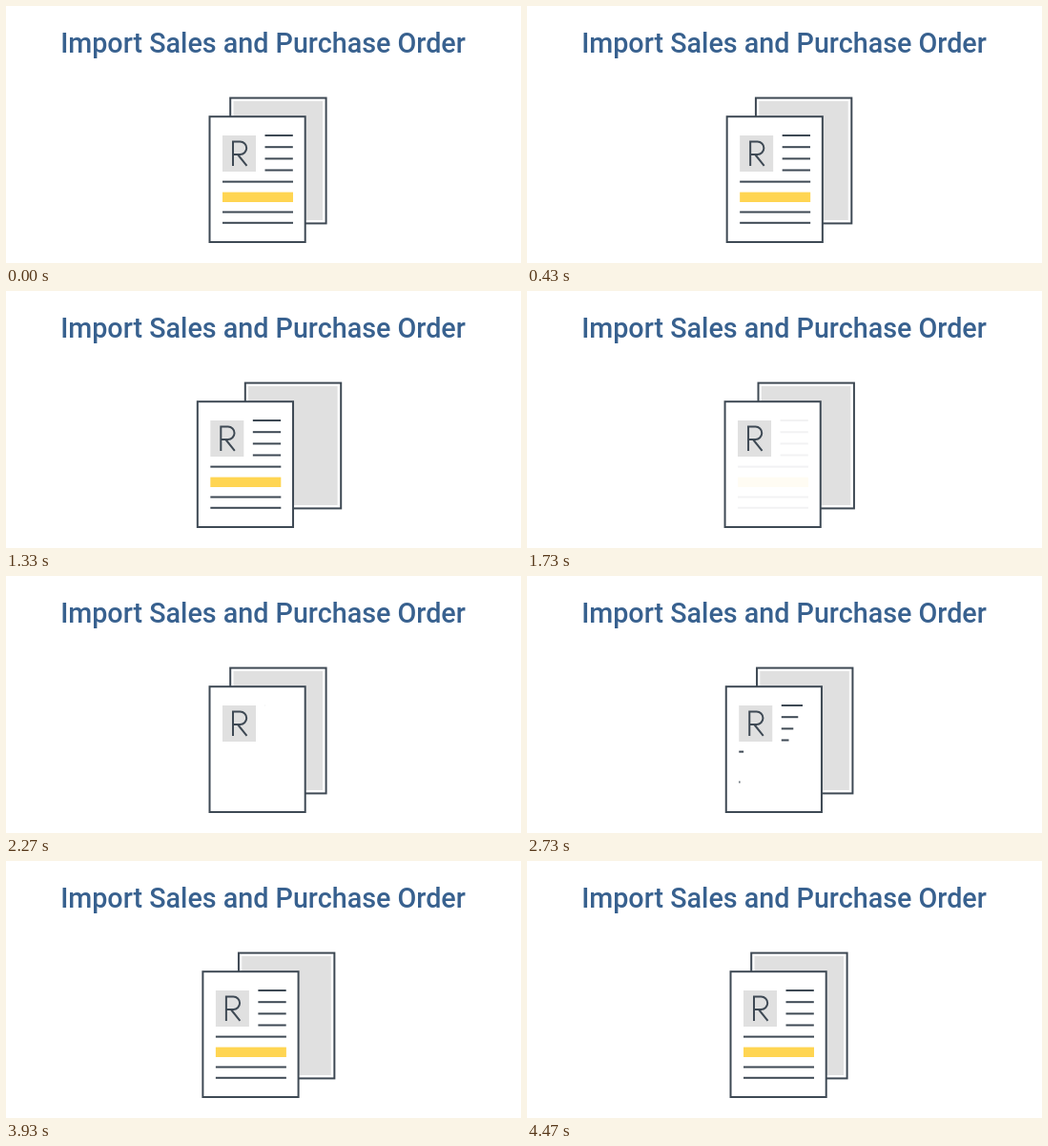
Animation of 540 by 270 pixels, one loop 4.51 s. Source, as an HTML page:

```html
<!DOCTYPE html>
<html lang="en">
<head>
<meta charset="utf-8">
<title>Import Sales and Purchase Order</title>
<style>
  html, body { margin: 0; width: 100%; height: 100%; overflow: hidden; background: #fff; }
  svg { display: block; width: 540px; height: 270px; }
  text { font: 500 28.7px Roboto, sans-serif; fill: #38618f; text-anchor: middle; }
  .page { fill: #fff; stroke: #3e4954; stroke-width: 2; }
  .ink { fill: none; stroke: #3e4954; stroke-width: 2; }
  .shade { fill: #e0e0e0; }
</style>
</head>
<body>
<svg viewBox="0 0 540 270">
  <text x="269.5" y="49">Import Sales and Purchase Order</text>
  <g id="back">
    <rect class="page" x="235.2" y="96.6" width="100.4" height="131.8"/>
    <rect class="shade" x="238.5" y="100" width="93.5" height="125"/>
  </g>
  <g id="front">
    <rect class="page" x="213.5" y="116.2" width="100.2" height="131.8"/>
    <rect class="shade" x="227" y="136" width="35" height="38"/>
    <path class="ink" d="M238 168V142.5h7.5a6.7 6.7 0 0 1 0 13.4H238M243 156l9.5 11.8"/>
    <g id="lines"></g>
  </g>
</svg>
<script>
const LOOP = 4510, HALF = LOOP / 2;
const REVEAL = HALF, STAGGER = 80;
const $ = id => document.getElementById(id);

// Smooth 0..1 progress from a start time over a duration
const ease = (t, start, duration) => {
  const p = Math.min(1, Math.max(0, (t - start) / duration));
  return p * p * (3 - 2 * p);
};

const addLine = (x, y, width, duration, height = 2, fill = '#3e4954') => {
  const bar = document.createElementNS('http://www.w3.org/2000/svg', 'rect');
  Object.entries({ x, y: y - height / 2, height, fill })
    .forEach(([name, value]) => bar.setAttribute(name, value));
  $('lines').append(bar);
  return { bar, width, duration };
};

// Listed in the order they are written
const lines = [
  ...[136, 148.2, 160.4, 172.5].map(y => addLine(271.5, y, 29.3, 700)),
  ...[184.6, 216.5, 227.8].map(y => addLine(227, y, 74, 1000)),
  addLine(227, 200.8, 74, 1000, 10.4, '#ffd552')
];

function draw(now) {
  const t = now % LOOP, s = t % HALF;
  const spread = ease(s, 100, 920) - ease(s, 1245, 920);
  $('back').setAttribute('transform', `translate(${16 * spread})`);
  $('front').setAttribute('transform', `translate(${-13 * spread})`);

  const rewriting = t >= REVEAL;
  $('lines').setAttribute('opacity', rewriting ? 1 : 1 - ease(t, 1350, 450));
  lines.forEach(({ bar, width, duration }, i) => {
    const shown = rewriting ? ease(t, REVEAL + i * STAGGER, duration) : 1;
    bar.setAttribute('width', width * shown);
  });
}

const begin = performance.now();
(function tick() {
  draw(performance.now() - begin);
  requestAnimationFrame(tick);
})();
</script>
</body>
</html>
```
